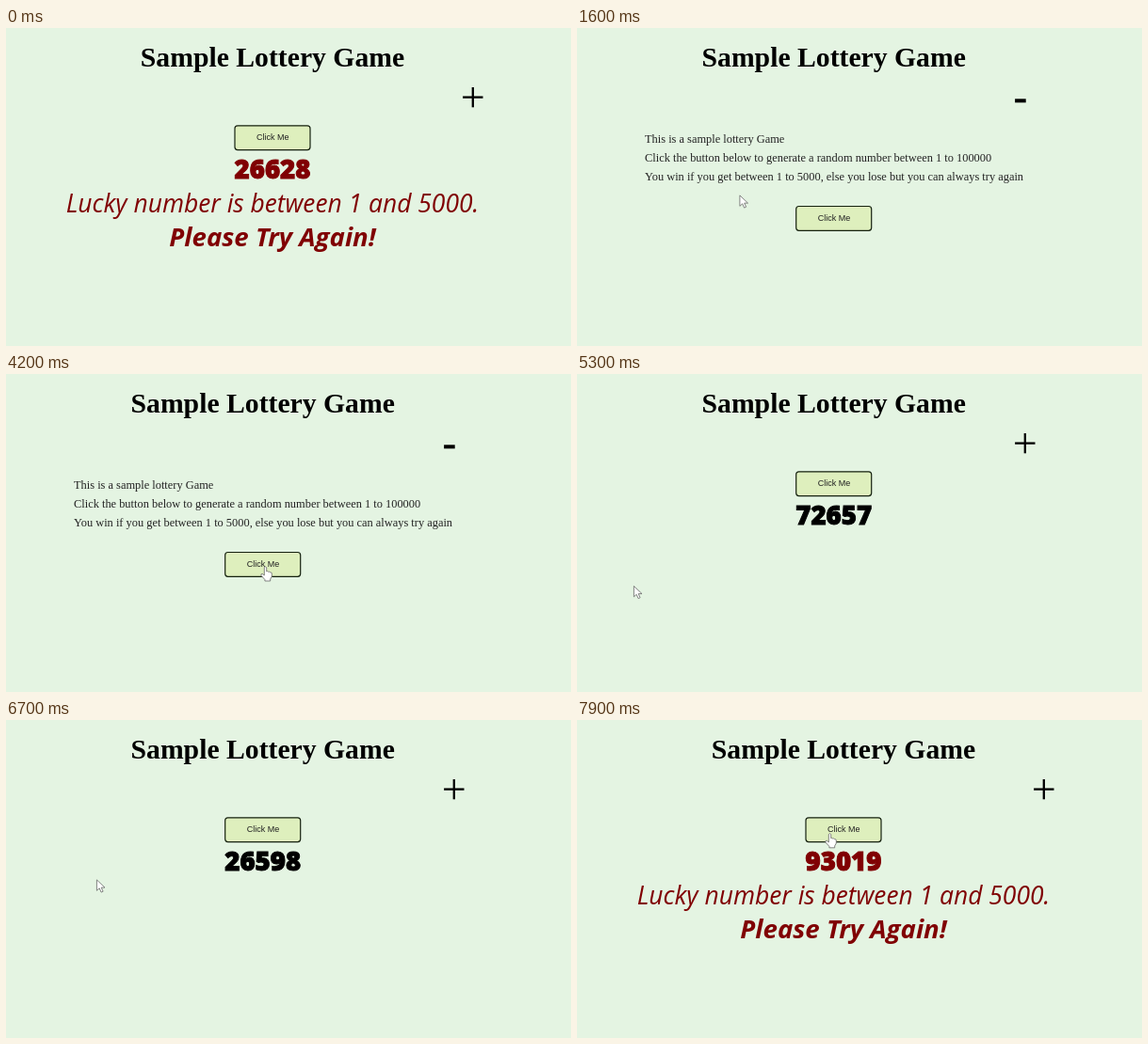
An HTML page with a canvas for the animation above (8000 ms loop, 600 by 338 pixels).

```html
<!DOCTYPE html>
<html lang="en">
<head>
<meta charset="utf-8">
<title>Sample Lottery Game</title>
<style>
  html, body { margin: 0; width: 100%; height: 100%; overflow: hidden; background: #e4f4e2; }
  canvas { display: block; width: 600px; height: 338px; }
</style>
</head>
<body>
<canvas id="stage" width="600" height="338"></canvas>
<script>
const ctx = document.getElementById('stage').getContext('2d');
const LOOP = 8000, STEP = 100, TRAVEL = 300;
const SERIF = '"Liberation Serif", serif';
const SANS = '"Open Sans", "Noto Sans", sans-serif';
const RED = '#800003';

// Each move leaves at a time and glides to a place
const move = (leave, x, y) => ({ leave, x, y });
const toToggle = leave => move(leave, 468.5, 77);
const moves = [
  move(600, 34, 133),
  move(900, 32, 173),
  move(1300, 172.5, 177.5),
  toToggle(1700),
  move(2780, 260, 113),
  toToggle(3200),
  move(3800, 275.5, 204.7),
  move(4850, 60, 225),
  move(5700, 19, 165),
  move(6400, 96, 169.5),
  move(6800, 15, 178),
  move(7340, 411, 116),
  move(7600, 268.5, 120.5)
];

const intro = [
  'This is a sample lottery Game',
  'Click the button below to generate a random number between 1 to 100000',
  'You win if you get between 1 to 5000, else you lose but you can always try again'
];

function viewAt(t) {
  if (t < 100 || t >= 7000) return 'result';
  if (t >= 4800) return 'rolling';
  return t >= 2600 && t < 3600 ? 'closed' : 'intro';
}

function pointerAt(t) {
  if (t < moves[1].leave) return null;
  const i = moves.findLastIndex(m => m.leave <= t);
  const from = moves[i - 1], to = moves[i];
  const u = Math.min(1, (t - to.leave) / TRAVEL);
  const k = u * u * (3 - 2 * u);
  return { x: from.x + (to.x - from.x) * k, y: from.y + (to.y - from.y) * k };
}

// Pseudo-random digits for the running draw
const rolledNumber = t => (54168 + 32424 * t / STEP) % 99999;

function text(str, x, y, font, color = '#000', align = 'center') {
  ctx.font = font;
  ctx.fillStyle = color;
  ctx.textAlign = align;
  ctx.fillText(str, x, y);
}

function heavyText(str, x, y, font, color) {
  text(str, x, y, font, color);
  ctx.strokeStyle = color;
  ctx.lineWidth = 1;
  ctx.lineJoin = 'miter';
  ctx.strokeText(str, x, y);
}

function drawButton(cx, cy) {
  ctx.beginPath();
  ctx.roundRect(cx - 40, cy - 12.9, 80, 25.8, 3);
  ctx.fillStyle = '#deefbd';
  ctx.fill();
  ctx.strokeStyle = '#15200f';
  ctx.lineWidth = 1.2;
  ctx.stroke();
  text('Click Me', cx + 0.3, cy + 2.7, '9px "Liberation Sans", sans-serif', '#222');
}

function drawToggle(cx, open, hot) {
  ctx.fillStyle = '#000';
  if (open) {
    ctx.fillRect(cx - 10.7, 75.3, 11.6, 4);
    return;
  }
  const w = hot ? 2.7 : 2.3;
  ctx.fillRect(cx - 10.7, 73.6 - w / 2, 21.4, w);
  ctx.fillRect(cx - w / 2, 63, w, 21.3);
}

function drawPointer({ x, y }, outline) {
  const shape = new Path2D(outline);
  ctx.save();
  ctx.translate(x, y);
  ctx.fillStyle = '#fff';
  ctx.strokeStyle = '#666';
  ctx.lineWidth = 0.8;
  ctx.lineJoin = 'round';
  ctx.fill(shape);
  ctx.stroke(shape);
  ctx.restore();
}

const ARROW = 'M.4 .4V11.8L3.2 9.3L5.1 13.6L7.1 12.7L5.2 8.6H9Z';
const HAND = 'M-1.2 1Q0 -.7 1.2 1V5.2Q2.3 4.2 3.2 5.6Q4.4 4.8 5.1 6.2Q6.7 5.8 6.8 7.5' +
  'V10.5L5.2 13.3V15.3H-.6V13.8L-4.6 9.5Q-5 7.4 -3.2 7.7L-1.2 9.3Z';

function draw(t) {
  const view = viewAt(t);
  const open = view === 'intro', done = view === 'result';
  const cx = done ? 283 : 272.7;
  const toggleX = cx + 213;
  const shownToggleX = toggleX - (done ? 0.2 : 9.9);
  const buttonY = open ? 202.4 : 116.7;
  const p = pointerAt(t);
  const near = (x, y, w, h) => p && Math.abs(p.x - x) < w && Math.abs(p.y - y) < h;
  const onToggle = near(shownToggleX, 74, 11, 10);
  const onButton = near(cx, buttonY, 40, 13);

  ctx.fillStyle = '#e4f4e2';
  ctx.fillRect(0, 0, 600, 338);
  text('Sample Lottery Game', cx, 40.6, `bold 29.7px ${SERIF}`);
  drawToggle(shownToggleX, open, onToggle);
  drawButton(cx, buttonY);

  if (open) {
    intro.forEach((line, i) => text(line, 72, 122 + i * 20.1, `12.4px ${SERIF}`, '#222', 'left'));
  }
  if (view === 'rolling') {
    heavyText(rolledNumber(t), cx, 160, `800 27.6px ${SANS}`, '#000');
  }
  if (done) {
    heavyText(t < STEP ? 26628 : 93019, cx, 160, `800 27.6px ${SANS}`, RED);
    text('Lucky number is between 1 and 5000.', cx, 195.8, `italic 26.45px ${SANS}`, RED);
    text('Please Try Again!', cx, 231.8, `italic bold 27.6px ${SANS}`, RED);
  }
  if (p) drawPointer(p, onToggle || onButton ? HAND : ARROW);
}

const start = performance.now();
function tick() {
  const t = (performance.now() - start) % LOOP;
  draw(Math.floor(t / STEP) * STEP);
  requestAnimationFrame(tick);
}
tick();
</script>
</body>
</html>
```
